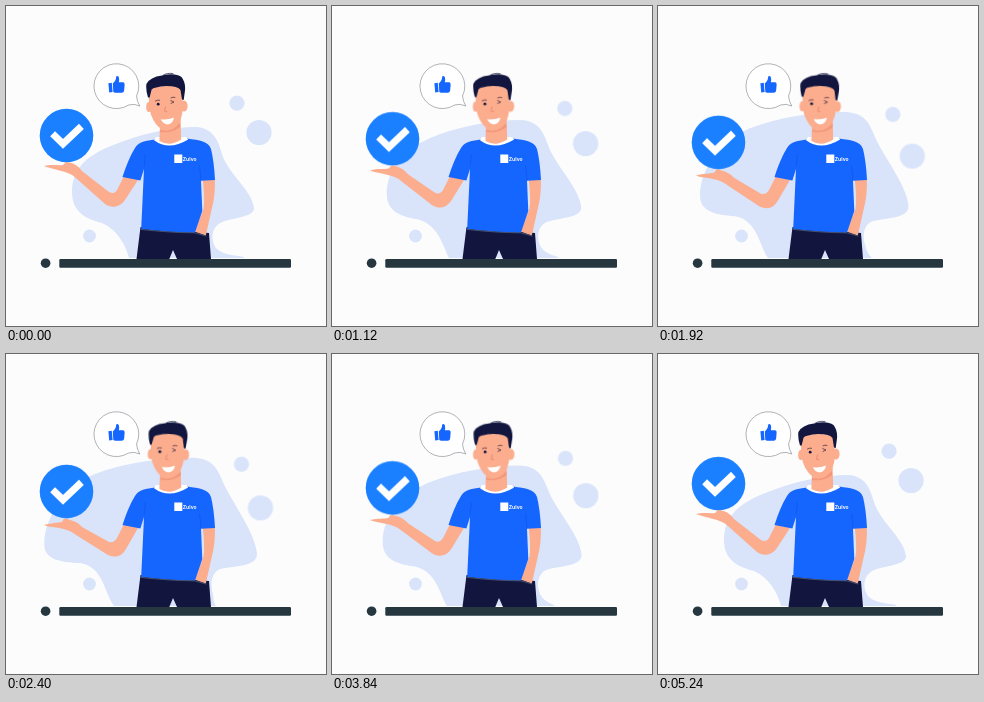
These frames come from a looping animation (320 px wide and 320 px high, 5.28 s). An HTML page:

```html
<!DOCTYPE html>
<html lang="en">
<head>
<meta charset="utf-8">
<title>All done</title>
<style>
  html, body { margin: 0; width: 100%; height: 100%; overflow: hidden; background: #fcfcfc; }
  svg { display: block; width: 100vw; height: 100vh; }

  .pale { fill: #d9e4fb; }
  .skin { fill: #fbad8e; }
  .blue { fill: #1565ff; }
  .navy { fill: #12163f; }
  .dark { fill: #263740; }
  .line { fill: none; stroke-linecap: round; }

  /* Every part swings out and back on the same clock. */
  .sway { animation: 5280ms cubic-bezier(.37, 0, .63, 1) infinite; }

  #blob {
    d: path("M123 252 C120 240 112 224 96 217 C80 213 66 206 66 186 C66 162 82 149 106 139.5 C134 128 165 121 190 121 C207 122 212 134 216 148 C222 168 246 184 248 202 C248 212 226 211 214 217 C203 224 206 238 211 243 C218 249 228 249 238 251 L238 252 Z");
    animation-name: blob;
  }
  @keyframes blob {
    48.5% { d: path("M108 252 C98 240 98 213 74 209 C54 208 38 206 38 190 C38 162 60 133 88 120 C118 108 155 104 184 103.5 C204 103 210 112 215 123 C222 143 250 178 251 200 C251 213 228 212 214 215 C205 219 204 230 207 240 C207 245 208 249 209 251 L209 252 Z"); }
  }

  #arm {
    d: path("M38 160 C46 158 52 160 57 159 L60 156 C66 156 73 160 76 165 L103 186 C107 188 109 187 111 184 L118 170 L132 174 L119 194 C114 201 106 203 99 198 L71 173 C65 167 59 166 50 163.5 C44 162 40 161 38 160 Z");
    animation-name: arm;
  }
  @keyframes arm {
    48.5% { d: path("M38 171 C46 169 51 169 56 168 L58 164.5 C64 166 71 167 76 173 L103 188 C107 189 109 187 111 184 L118 170 L132 174 L120 195 C115 203 110 204 102 201 L70 181 C64 176 58 175 50 173.5 C44 173 40 172 38 171 Z"); }
  }

  #ball { animation-name: ball; }
  @keyframes ball { 48.5% { transform: translateY(8px); } }

  #head { transform-origin: 163px 135px; animation-name: head; }
  @keyframes head { 48.5% { transform: rotate(2.6deg); } }

  #small { animation-name: small; }
  @keyframes small { 48.5% { transform: translate(4.5px, 13.2px); } }

  #large { animation-name: large; }
  @keyframes large { 48.5% { transform: translate(1.5px, 27.6px); } }

  text { font: 700 5px Inter, "Open Sans", sans-serif; fill: #fff; }
</style>
</head>
<body>
<svg viewBox="0 0 320 320">
  <!-- backdrop -->
  <path id="blob" class="pale sway"/>
  <circle id="small" class="pale sway" cx="231" cy="97.2" r="7.6"/>
  <circle id="large" class="pale sway" cx="253" cy="126.5" r="12.6"/>
  <circle class="pale" cx="83.5" cy="230" r="6.4"/>

  <!-- speech bubble -->
  <path d="M122.5 99 A22.4 22.4 0 1 1 130.5 90 Q131 95.5 133.8 100 Q128 97.2 122.5 99 Z"
        fill="#fff" stroke="#62676f" stroke-width=".5"/>
  <g class="blue">
    <path d="M102.4 77.2 L105.8 76.8 L106.6 86 L103.2 86.4 Z"/>
    <path d="M106.8 77.4 Q110 75 110.2 70.6 Q111.4 69 112.8 71 Q113.6 74 112.8 76.2 H117.4 Q119 76.8 118.6 79 L118.2 84 Q118 86.8 116 86.8 H109 L107.3 86 Z"/>
  </g>

  <!-- ball and raised arm -->
  <g id="ball" class="sway">
    <circle cx="60.5" cy="129.6" r="26.8" fill="#1a80ff"/>
    <path d="M46.6 127.8 L57 137.8 L75.4 120.4" fill="none" stroke="#fff" stroke-width="7"/>
  </g>
  <path id="arm" class="skin sway"/>

  <!-- trousers and resting arm -->
  <path class="navy" d="M134.5 221 L203 227 L205 253 H171 L167 244 L163.3 253 H130.5 Z"/>
  <path class="skin" d="M196.5 172 H208.9 C209.3 184 208.3 194 205.5 204 L199.8 229.5 L188.5 225.5 L197.5 203 Q199.2 192 196.5 172 Z"/>

  <!-- shirt -->
  <path class="blue" d="M149 133.5 C140 135 133 135 129 142 C124 150 120 160 116.5 171 L134.4 174.5 L138 163 L135.2 223 Q165 226.4 188.8 227 L196.3 205 L195 174.8 L209 174 Q208 155 205 143 C202 135 194 134.5 181 132.5 Z"/>
  <path class="line" d="M138.2 160 L139.3 149 M195 174 L193.6 160" stroke="#0f50d8" stroke-width=".5"/>
  <path class="line" d="M135.2 223.4 Q165 226.8 188.5 226.8 L200 230" stroke="#46516f" stroke-width="1"/>
  <path d="M148 134.2 Q163 145 182.2 133.4 L180 131 H150 Z" fill="#fff"/>
  <rect x="168.3" y="148.5" width="8" height="8.5" fill="#fff"/>
  <text x="176.8" y="155.3">Zulvo</text>

  <!-- head -->
  <path class="skin" d="M154 118 L174.5 108 L175.2 133.5 Q164 141 153.4 135 Z"/>
  <g id="head" class="sway">
    <path d="M154 124 Q166 127 173.8 117 L174 121 Q166 127.5 154 126 Z" fill="#f3967a"/>
    <ellipse class="skin" cx="143" cy="101" rx="2.8" ry="5"/>
    <ellipse class="skin" cx="178" cy="100" rx="3.6" ry="5.6"/>
    <path class="skin" d="M142.5 84 Q160 76 176.6 83 L176.8 103 Q176 116 168 122 Q161 126.5 154 122 Q146 116 143.3 102 Z"/>
    <path class="navy" d="M142 91.5 Q139.6 84 140.4 78 Q144 71 156 69.5 Q169 66.5 175.5 71 Q180.2 77 178.8 86 L177.7 94 L176 93.5 L174.5 84 Q172 80 160 80 Q148 81 145.6 83.5 L143.6 91.5 Z"/>
    <path class="line" d="M157 69.3 Q161 66.5 167 67.6" stroke="#12163f" stroke-width=".7"/>
    <circle class="navy" cx="152.2" cy="98.2" r="1.4"/>
    <path class="line" d="M149.4 95 Q151.5 93.6 153.6 94.2 M165 91.8 Q167 90.6 169 91.4 M164.8 94.6 L168 96 L165 97.4"
          stroke="#3b2440" stroke-width=".7"/>
    <path class="line" d="M159.4 101 L158.6 105.2 Q159.4 106.2 160.8 105.6" stroke="#e8785c" stroke-width=".7"/>
    <path d="M154.8 113.2 Q161 114.4 168 111.4 Q167.2 117.4 161.8 118.4 Q157 118.2 154.8 113.2 Z" fill="#fff"/>
  </g>

  <!-- floor -->
  <circle class="dark" cx="39.6" cy="257.2" r="4.8"/>
  <rect class="dark" x="53.3" y="253" width="231.7" height="8.8" rx="1.2"/>
</svg>
</body>
</html>
```
